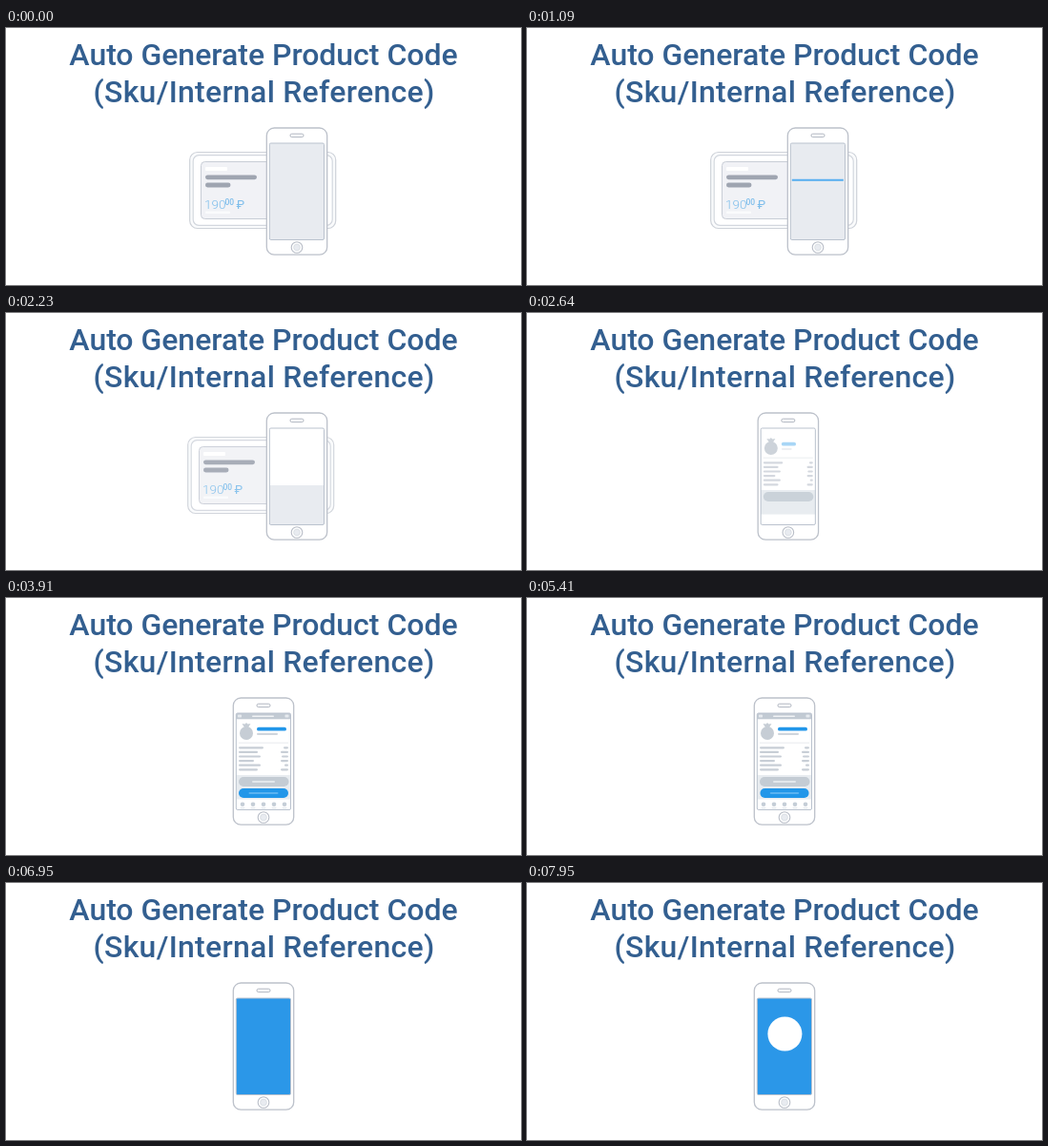
Animation of 540 by 270 pixels, one loop 8 s. Source, as an HTML page:

```html
<!DOCTYPE html>
<html lang="en">
<head>
<meta charset="utf-8">
<title>Auto Generate Product Code</title>
<style>
  html, body { margin: 0; width: 100%; height: 100%; overflow: hidden; background: #fff; }
  svg { display: block; width: 100%; height: 100%; }
  .title { font: 500 32px Roboto, "Open Sans", sans-serif; fill: #335f90; text-anchor: middle; }
  .price { font: 300 13.5px Roboto, "Noto Sans", sans-serif; fill: #7dbdeb; }
  .cents { font-size: 8.5px; font-weight: 500; }
  .sign { font-size: 13px; font-weight: 400; }
</style>
</head>
<body>
<svg viewBox="0 0 540 270">
  <defs>
    <clipPath id="screenClip"><rect x="3.3" y="121" width="57.2" height="101.5" rx="1.5"/></clipPath>
  </defs>
  <text class="title" x="270" y="39" letter-spacing="-.03">Auto Generate Product Code</text>
  <text class="title" x="270.6" y="78" letter-spacing=".28">(Sku/Internal Reference)</text>

  <g id="card">
    <rect x="192.7" y="130.5" width="153" height="80" rx="8" fill="#fafbfc" stroke="#ced2d9" stroke-width="1.2"/>
    <rect x="196.2" y="133.7" width="146" height="73.6" rx="6" fill="#fff" stroke="#d3d7de" stroke-width="1.2"/>
    <rect x="204.5" y="140.5" width="130" height="60" rx="4" fill="#f1f2f6" stroke="#c8cdd6"/>
    <rect x="209" y="146" width="23" height="4" rx="1" fill="#fff"/>
    <rect x="209" y="154.4" width="54" height="4.8" rx="2.4" fill="#9fa5b1"/>
    <rect x="209" y="162.6" width="26.5" height="4.8" rx="2.4" fill="#9fa5b1"/>
    <rect x="209" y="192.5" width="26" height="2.5" rx="1" fill="#fafbfc"/>
    <text class="price" x="208" y="190">190</text>
    <text class="price cents" x="229.5" y="186">00</text>
    <text class="price sign" x="241.5" y="190">₽</text>
  </g>

  <g id="phone">
    <rect x=".3" y="105" width="63.4" height="133.2" rx="8" fill="#fff" stroke="#bcc1ca" stroke-width="1.3"/>
    <rect x="25" y="111.2" width="14" height="3.4" rx="1.7" fill="#fff" stroke="#b0b6c0"/>
    <circle cx="32" cy="230.5" r="5.8" fill="#fff" stroke="#b8bdc7" stroke-width="1.1"/>
    <circle cx="32" cy="230.5" r="3.4" fill="#e8ebf0" stroke="#d3d8df" stroke-width=".7"/>
    <g clip-path="url(#screenClip)">
      <rect x="3" y="120" width="58" height="103" fill="#e8ebf0"/>
      <rect id="sheet" x="3" y="121" width="58" fill="#fff"/>
      <g id="page"></g>
      <circle id="flood" cx="32" cy="205" fill="#2b97e8"/>
      <circle id="badge" cx="32.4" cy="158.5" fill="#fff"/>
    </g>
    <rect x="3.3" y="121" width="57.2" height="101.5" rx="1.5" fill="none" stroke="#bac2ce"/>
    <rect id="scan" x="4.8" width="54" height="2" fill="#55aef0"/>
  </g>
</svg>
<script>
const LOOP = 8000;
const NS = "http://www.w3.org/2000/svg";
const $ = id => document.getElementById(id);
const [card, phone, sheet, page, flood, badge, scan] =
  ["card", "phone", "sheet", "page", "flood", "badge", "scan"].map($);

const clamp = v => Math.min(1, Math.max(0, v));
const span = (t, from, to) => clamp((t - from) / (to - from));
const mix = (a, b, p) => a + (b - a) * p;
const inOut = p => p < .5 ? 4 * p ** 3 : 1 - 4 * (1 - p) ** 3;
const out = p => 1 - (1 - p) ** 3;

function set(el, attrs) {
  for (const k in attrs) el.setAttribute(k, attrs[k]);
  return el;
}
const add = (parent, tag, attrs = {}) =>
  parent.appendChild(set(document.createElementNS(NS, tag), attrs));
const bar = (parent, x, y, width, height, fill, rx = height / 2) =>
  add(parent, "rect", { x, y, width, height, fill, rx });

// Footer with the two buttons
const footer = add(page, "g");
bar(footer, 3, 186, 59, 26, "#e8ecf0", 0);
const tabs = add(page, "g");
bar(tabs, 3, 211.5, 59, 12, "#fff", 0);
const icons = add(tabs, "g");
for (let i = 0; i < 5; i++) {
  add(icons, "circle", { cx: 10 + i * 11, cy: 216.8, r: 2.3, fill: "#c5ced7" });
  bar(icons, 7.5 + i * 11, 220.3, 5, 1, "#dce1e7");
}
const grey = add(page, "g");
bar(grey, 6, 188, 52.5, 10, "#c4ccd4");
const greyLabel = bar(grey, 20, 191.9, 24, 2, "#e3e8ec");
const blue = add(page, "g");
bar(blue, 6, 200, 52, 10, "#2196e9");
const blueLabel = bar(blue, 16, 204, 31, 2, "#58b2f1");

// Header, product and list
const header = add(page, "g");
bar(header, 3, 121, 59, 6.3, "#c2cad3", 0);
bar(header, 5, 122.6, 4, 3, "#e6eaee", .8);
bar(header, 54.5, 122.6, 4, 3, "#e6eaee", .8);
bar(header, 20, 123.4, 23, 1.6, "#f1f3f5");
const bag = add(page, "g", { fill: "#c6cdd5" });
add(bag, "circle", { cx: 14, cy: 142, r: 7 });
add(bag, "path", { d: "M12 136L9.5 132L12.5 132.6L14 131L15.5 132.6L18.5 132L16 136Z" });
const name = bar(page, 25, 135.8, 31, 3.8, "#2196e9");
const note = bar(page, 25, 141.8, 22, 2.3, "#d0d6dd");
const rule = bar(page, 6, 151.7, 52, .9, "#e4e8ec", 0);
const rows = [[26, 5], [20, 8], [23, 7], [16, 8], [23, 4], [20, 8]].map(([left, right], i) => {
  const y = 156.2 + i * 4.6;
  return { left, right, a: bar(page, 6, y, left, 2.2, "#c8ced6"), b: bar(page, 50, y, right, 2.2, "#c8ced6") };
});
const touch = add(page, "circle", { cx: 32, cy: 205, r: 4, fill: "#a9d6f7" });

const fade = (el, p) => set(el, { opacity: p });
const centred = (el, full, p) => set(el, { x: 32 - full * p / 2, width: full * p });

function drawScan(t) {
  const visible = span(t, 90, 150) * (1 - span(t, 1270, 1320));
  const y = t < 720 ? mix(137, 194, span(t, 90, 720)) : mix(194, 137, span(t, 720, 1320));
  set(scan, { y, opacity: visible });
}

function drawCard(t) {
  const back = -2 * inOut(span(t, 1900, 2230));
  const fly = 75 * span(t, 2260, 2640) ** 2;
  set(card, {
    transform: `translate(${back + fly})`,
    opacity: (1 - .1 * span(t, 1900, 2230)) * (1 - span(t, 2350, 2610))
  });
}

function drawPage(t) {
  const grow = out(span(t, 2400, 3000));
  set(sheet, { height: mix(0, 60, inOut(span(t, 1700, 2230))) + 5 * span(t, 2300, 2640) });
  fade(footer, span(t, 2300, 2640));
  set(tabs, { transform: `translate(0 ${mix(12, 0, out(span(t, 2380, 2700)))})` });
  fade(icons, span(t, 2700, 3180));
  fade(grey, span(t, 2400, 2700));
  centred(greyLabel, 24, out(span(t, 2700, 3300)));
  fade(blue, span(t, 2750, 3350));
  centred(blueLabel, 31, out(span(t, 3000, 3700)));
  const shrink = mix(1, .965, span(t, 4450, 6500)) - .03 * span(t, 6460, 6600);
  set(blue, { transform: `translate(32 205) scale(${shrink}) translate(-32 -205)` });

  set(header, { transform: `translate(0 ${mix(-7, 0, out(span(t, 2700, 3400)))})`, opacity: span(t, 2700, 3200) });
  fade(bag, span(t, 2380, 2680));
  const tint = span(t, 2460, 2920);
  set(name, { width: 31 * out(span(t, 2500, 3200)), opacity: tint });
  set(note, { width: 22 * out(span(t, 2500, 3200)), opacity: tint });
  fade(rule, span(t, 2400, 2700));
  for (const { left, right, a, b } of rows) {
    set(a, { width: left * grow, opacity: grow });
    set(b, { x: 58 - right * grow, width: right * grow, opacity: grow });
  }
  set(touch, { opacity: .9 * span(t, 6150, 6480), r: mix(6, 4, out(span(t, 6150, 6480))) });
}

function draw(t) {
  set(phone, { transform: `translate(${mix(273, 238, inOut(span(t, 2250, 2810)))})` });
  drawScan(t);
  drawCard(t);
  drawPage(t);
  set(flood, { r: 92 * inOut(span(t, 6600, 6940)) });
  const pop = out(span(t, 7410, 7850));
  set(badge, { r: 18 * pop, opacity: pop });
}

const start = performance.now();
function tick() {
  draw((performance.now() - start) % LOOP);
  requestAnimationFrame(tick);
}
draw(0);
requestAnimationFrame(tick);
</script>
</body>
</html>
```
